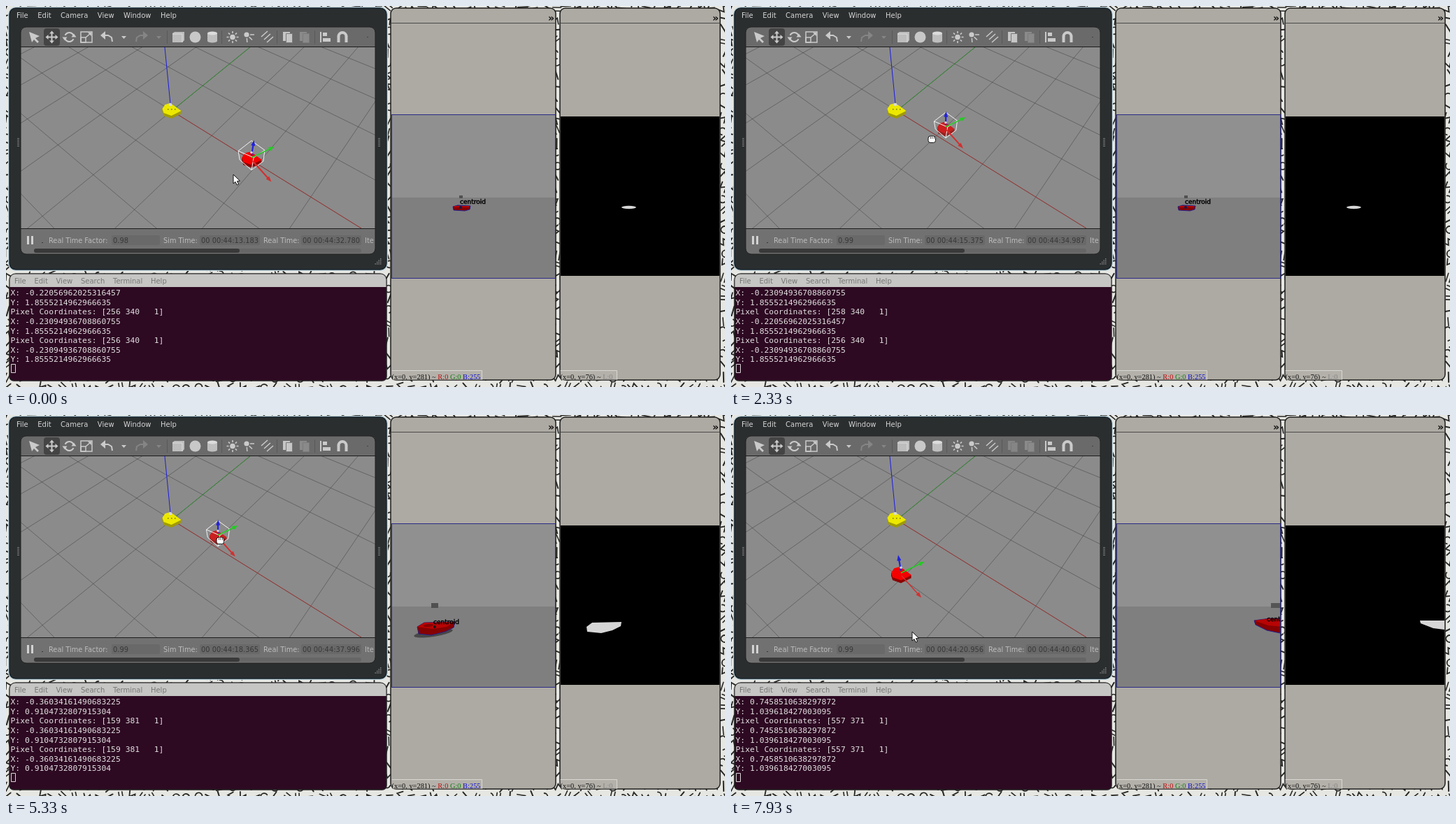
These frames come from a looping animation (1028x545 px, 8 s). An HTML page with a canvas:

```html
<!DOCTYPE html>
<html lang="en">
<head>
<meta charset="utf-8">
<title>Robot simulation desktop</title>
<style>
html, body { margin: 0; width: 100%; height: 100%; overflow: hidden; background: #e4e4e0; }
canvas { display: block; }
</style>
</head>
<body>
<canvas id="stage" width="1028" height="545"></canvas>
<script>
const W = 1028, H = 545, LOOP = 8000;
const SANS = '"DejaVu Sans", sans-serif';
const MONO = '"DejaVu Sans Mono", monospace';
const SERIF = '"Liberation Serif", serif';
const screen = document.getElementById('stage').getContext('2d');
let g = screen;

// ---- drawing helpers ----
function rect(x, y, w, h, fill) { g.fillStyle = fill; g.fillRect(x, y, w, h); }
function paint(fill, stroke, width = 1) {
  if (fill) { g.fillStyle = fill; g.fill(); }
  if (stroke) { g.strokeStyle = stroke; g.lineWidth = width; g.stroke(); }
}
function round(x, y, w, h, r, fill, stroke, width) {
  g.beginPath(); g.roundRect(x, y, w, h, r); paint(fill, stroke, width);
}
function trace(p, ox = 0, oy = 0, s = 1) {
  g.beginPath();
  for (let i = 0; i < p.length; i += 2) g.lineTo(ox + p[i] * s, oy + p[i + 1] * s);
}
function poly(p, fill, ox, oy, s, stroke) { trace(p, ox, oy, s); g.closePath(); paint(fill, stroke); }
function line(p, color, width, ox, oy, s) { trace(p, ox, oy, s); paint(null, color, width); }
function arc(x, y, r, a, b, color, width) { g.beginPath(); g.arc(x, y, r, a, b); paint(null, color, width); }
function oval(x, y, rx, ry, fill, tilt = 0, stroke) {
  g.beginPath(); g.ellipse(x, y, rx, ry, tilt, 0, 7); paint(fill, stroke);
}
function disc(x, y, r, fill) { oval(x, y, r, r, fill); }
function text(s, x, y, size, color, font = SANS, weight = '') {
  g.font = `${weight} ${size}px ${font}`; g.fillStyle = color; g.fillText(s, x, y);
  return x + g.measureText(s).width;
}
function menu(names, x, y, gap, color) {
  for (const s of names.split(' ')) x = text(s, x, y, 10, color) + gap;
}
function clipped(x, y, w, h, draw) {
  g.save(); g.beginPath(); g.rect(x, y, w, h); g.clip(); draw(); g.restore();
}
function spin(x, y, a, draw) { g.save(); g.translate(x, y); g.rotate(a); draw(); g.restore(); }

// ---- timing ----
const GRAB = 1000, DROP = 2860, GRAB_2 = 5200, DROP_2 = 6800, JUMP = 7200;

function snap(t) {
  if (t > 1670 && t < 2330) t = 1670;
  const step = t < 4000 ? 66.7 : 200;
  return Math.floor(t / step) * step;
}
function along(keys, t) {
  const i = keys.findIndex(k => k[0] > t);
  if (i < 1) return (i ? keys.at(-1) : keys[0]).slice(1);
  const a = keys[i - 1], b = keys[i], f = (t - a[0]) / (b[0] - a[0]);
  return [a[1] + (b[1] - a[1]) * f, a[2] + (b[2] - a[2]) * f];
}
const BOAT = [[GRAB, 351, 220], [1330, 337, 207], [2260, 307, 176], [DROP, 304, 174], [GRAB_2, 303, 175],
  [6200, 248, 231], [6600, 243, 229]];
const MOUSE = [[0, 325, 241], [900, 344, 222], [1330, 330, 212], [2260, 287, 191], [DROP, 287, 191],
  [3260, 337, 254], [4200, 337, 254], [GRAB_2, 306, 180], [6200, 255, 231], [DROP_2, 251, 232], [7400, 259, 310]];

// ---- static desktop ----
function random(seed) {
  return () => (seed = (seed * 16807) % 2147483647) / 2147483647;
}
function wallpaper() {
  const rnd = random(77), ink = '#272726', cell = 16;
  rect(0, 0, W, H, '#e6e6e2');
  g.lineCap = 'round';
  for (let y = 0; y < H + cell; y += cell) for (let x = 0; x < W + cell; x += cell) {
    const kind = rnd() * 4 | 0;
    spin(x + rnd() * 5, y + rnd() * 5, rnd() * 6.3, () => {
      if (kind == 0) line([-7, 0, 7, 0], ink, 2);
      else if (kind == 1) for (const d of [-3, 2]) line([-6, d, 6, d], ink, 1.6);
      else if (kind == 2) line([-7, -3, -2, 4, 2, -4, 7, 3], ink, 1.8);
      else arc(0, 0, 5, 0, 4, ink, 1.8);
    });
  }
  g.lineCap = 'butt';
}

// Ground plane: the vanishing points of both axes, seen from above.
function project(x, y) {
  const a = -0.0649 * x, b = 0.076 * y, w = 1 + a + b;
  return [(237 - 585 * a + 863 * b) / w, (150 - 360 * (a + b)) / w];
}
function ground() {
  const gray = 'rgba(50,50,50,.55)';
  rect(21, 59, 507, 260, '#8b8b8b');
  for (let i = -10; i <= 10; i++) {
    const xEnd = Math.min(10, (0.85 + 0.076 * i) / 0.0649);
    const yEnd = Math.max(-10, (0.0649 * i - 0.85) / 0.076);
    line([...project(-10, i), ...project(xEnd, i)], gray, 0.8);
    line([...project(i, 10), ...project(i, yEnd)], gray, 0.8);
  }
  line([237, 150, 508, 318], '#a03434', 1);
  line([237, 150, 349, 59], '#2f8a2f', 1);
  line([235, 140, 227, 59], '#1c1ce0', 1);
}

function toolbar() {
  const c = '#cacaca', dim = '#858585';
  rect(21, 30, 507, 29, '#6a6a6a');
  round(54, 32, 23, 25, 4, '#444');
  poly([33, 37, 48, 43, 42, 46, 47, 51, 45, 53, 40, 48, 37, 52], c);
  for (let i = 0; i < 4; i++) spin(65.5, 44.5, i * Math.PI / 2, () => {
    line([0, 0, 6, 0], c, 2); poly([5, -3.5, 9, 0, 5, 3.5], c);
  });
  for (let i = 0; i < 2; i++) spin(90.5, 44.5, i * Math.PI, () => {
    arc(0, 0, 6.5, 0.4, 2.8, c, 2); poly([3, 0, 10, 0, 6.5, -5], c);
  });
  round(107, 37, 16, 15, 0, null, c, 1.5);
  round(107, 45, 7, 7, 0, null, c, 1.5);
  line([114, 45, 121, 39], c, 1.6); poly([117, 38, 122, 38, 122, 43], c);
  for (const [x, d, color] of [[144, 1, c], [194, -1, dim]]) {
    g.save(); g.translate(x, 45); g.scale(d, 1);
    line([-7, -3, 2, -3, 7, 0, 8, 6], color, 2); poly([-9, -3, -2, -9, -2, 3], color);
    g.restore();
    poly([-3.5, -2, 3.5, -2, 0, 2], color, x + 24.5, 45);
  }
  for (const x of [230, 308, 387, 441]) rect(x, 35, 1, 19, '#595959');
  poly([238, 39, 241, 37, 255, 37, 255, 49, 252, 52, 238, 52], '#bdbdbd');
  line([238, 40, 252, 40, 252, 52], '#dedede', 1);
  disc(270.5, 44.5, 8, '#c8c8c8');
  rect(288, 39, 14, 11, '#bebebe');
  oval(295, 50, 7, 2.6, '#bebebe'); oval(295, 39, 7, 2.6, '#dcdcdc');
  disc(324, 44.5, 3.8, c);
  for (let i = 0; i < 8; i++) spin(324, 44.5, i * Math.PI / 4, () => line([5.5, 0, 8.5, 0], c, 1.6));
  disc(344, 41, 3.6, c);
  for (let i = 0; i < 3; i++) {
    spin(344, 41, i * 0.75, () => line([5, 0, 11, 0], c, 1.5));
    line([365 + i * 4, 44 + i * 4, 374 + i * 4, 36 + i * 4], c, 1.5);
  }
  rect(449, 37, 2, 15, c); rect(453, 38, 6, 5, c); rect(453, 46, 11, 5, c);
  arc(481, 43.5, 5.5, Math.PI, 0, c, 4);
  for (const x of [473.5, 484.5]) rect(x, 43, 4, 9, c);
  rect(516, 44, 2, 1, '#444');
}

function simWindow() {
  round(5, 3, 539, 374, 9, null, '#c3d6de', 4);
  round(5, 3, 539, 374, 9, '#2b2e2f', '#17242c', 1.5);
  menu('File Edit Camera View Window Help', 15, 17, 13.5, '#d4d4d4');
  g.save(); g.beginPath(); g.roundRect(21, 30, 507, 325, 8); g.clip();
  rect(21, 30, 507, 325, '#717171');
  toolbar();
  clipped(21, 59, 507, 260, ground);
  for (const y of [58, 318]) rect(21, y, 507, 1, '#1c1c1c');
  for (const x of [30, 36]) rect(x, 329, 3, 12, '#d2d2d2');
  rect(51, 338, 2, 1, '#383838');
  for (const [s, x] of [['Real Time Factor:', 61], ['Sim Time:', 225], ['Real Time:', 368], ['Ite', 513]])
    text(s, x, 338.5, 9.8, '#bcbcbc');
  for (const [x, w] of [[151, 69], [277, 86], [422, 86]]) round(x, 328, w, 14, 2, '#696969');
  round(40, 347, 468, 6, 3, '#666');
  round(40, 347, 294, 6, 3, '#393939');
  g.restore();
  round(21, 30, 507, 325, 8, null, '#202020');
  for (const x of [16, 532]) for (let i = 0; i < 6; i++) rect(x, 189 + i * 2.2, 3, 1, '#777');
  for (let i = 0; i < 4; i++) for (let j = 0; j <= i; j++) rect(535 - j * 2.5, 361 + i * 2.4, 1.4, 1.4, '#8a8a8a');
}

function terminal() {
  round(5, 383, 539, 153, [9, 9, 6, 6], '#2d0922', '#222', 1.5);
  round(5.5, 383.5, 538, 18.5, [8, 8, 0, 0], '#c6c6c4');
  menu('File Edit View Search Terminal Help', 12, 397, 11.7, '#777');
}

function viewer(x, w) {
  round(x, 3, w, 532, 8, '#adaaa3', '#1d1d1d', 1.5);
  rect(x + 1, 24, w - 2, 1, '#4b4a47');
  text('»', x + w - 11, 22, 14, '#111', SANS, 'bold');
}
function statusBar(x, right, parts) {
  clipped(x, 515, right - x + 1, 19.5, () => {
    rect(x, 521, right - x, 14, '#b4b1aa');
    line([x, 521.5, right - 0.5, 521.5, right - 0.5, 535], '#d9d7d2', 1);
    let at = x;
    for (const [s, color] of parts) at = text(s, at, 534, 10.4, color, SERIF);
  });
}

function desktop() {
  wallpaper();
  simWindow();
  terminal();
  viewer(550, 236);
  statusBar(551.5, 681, [['(x=0, y=281) ~ ', '#111'], ['R:0 ', '#c01010'], ['G:0 ', '#108010'], ['B:255', '#1010d0']]);
  viewer(792, 229);
  statusBar(792.5, 874, [['(x=0, y=76) ~ ', '#111'], ['L:0', '#858585']]);
  rect(793, 158, 227, 228, '#000');
  rect(551, 155, 235, 235, '#2a2a84');
  rect(552, 156, 233, 118, '#909090');
  rect(552, 274, 233, 115, '#7f7f7f');
}

// ---- moving parts ----
const HULL = [-13, -3, -9, -9, -2, -11, 3, -8, 14, 0, 0, 7, -11, 3];

function hull(x, y, s, top, side) {
  for (let d = 4; d > 0; d--) poly(HULL, side, x, y + d, s);
  poly(HULL, top, x, y, s);
}
function arrow(x, y, dx, dy, color, width) {
  const n = Math.hypot(dx, dy);
  spin(x, y, Math.atan2(dy, dx), () => {
    line([0, 0, n - 5, 0], color, width);
    poly([n, 0, n - 8, 3, n - 8, -3], color);
  });
}
function yellowBoat() {
  hull(236.5, 150, 1, '#ece800', '#a09c00');
  for (const x of [231, 236, 241]) rect(x, 147, 1.5, 1.5, '#77740a');
  disc(235, 141, 2.2, '#d8d8e4');
}
function redBoat(x, y, selected, held) {
  const s = 0.92 + (y - 176) * 0.003;
  hull(x, y, s, held ? '#cb2020' : '#f40000', held ? '#962424' : '#8c0000');
  if (selected) {
    const white = '#f4f4f4';
    poly([-18, -12, 0, -26, 18, -13, 3, -3], null, x, y, s, white);
    line([-18, -12, -16, 0, 0, 14, 16, 2, 18, -13], white, 1, x, y, s);
    line([3, -3, 0, 14], white, 1, x, y, s);
  }
  arrow(x + 1, y + 1, 26 * s, 29 * s, '#d23030', selected ? 2 : 1.4);
  arrow(x, y - 3, 31 * s, -15 * s, '#22cc22', 1.6);
  arrow(x, y - 6, (x - 300) * 0.07, -21 * s, '#2222d8', 2.2);
  disc(x, y - 10 * s, 1.8, '#d0d0e0');
}
function pointer(x, y) {
  poly([0, 0, 0, 13, 3, 10.5, 5.2, 15, 7.6, 14, 5.5, 9.5, 9.5, 9.2], '#fff', x, y, 1, '#111');
}
function hand(x, y) {
  round(x - 5, y - 5, 10.5, 9.5, 3, '#fff', '#111');
  for (const d of [-2, 0.5, 3]) rect(x + d, y - 4, 0.8, 3, '#333');
}

function copyIcons(on) {
  for (const [x, c] of [[396, on ? '#c6c6c6' : '#858585'], [420, '#8a8a8a']]) {
    rect(x, 37, 10, 13, c);
    round(x + 4.5, 39.5, 9, 13, 0, c, '#7a7a7a');
  }
}
function clock(t) {
  const n = Math.floor(t / 200), color = '#383838';
  const stamp = (from, step) => '00 00:44:' + (from + step * n).toFixed(3);
  text(n < 3 ? '0.98' : '0.99', 153, 338.5, 9.9, color);
  text(stamp(13.183, 0.1993), 279, 338.5, 9.9, color);
  text(stamp(32.78, 0.2006), 424, 338.5, 9.9, color);
}

// Tracked pixels in the order they are logged; the position follows from the camera model.
const PIXELS = { a: [256, 340], b: [258, 340], c: [256, 339], d: [159, 381], e: [557, 371] };
const LOG = 'baacaacaaabaaa' + 'd'.repeat(19) + 'eee';
const CENTER = 300.5, HEIGHT = 0.205, REACH = 73.2930991037182;

function readout(t) {
  const i = Math.floor(t / 233);
  const rows = [...LOG.slice(i, i + 3)].flatMap(key => {
    const [col, row] = PIXELS[key], depth = row - CENTER;
    return [`Pixel Coordinates: [${col} ${row}   1]`, 'X: ' + HEIGHT * (col - CENTER) / depth, 'Y: ' + REACH / depth];
  }).slice(1);
  rows.forEach((s, k) => text(s, 6.5, 414 + k * 13.64, 11.37, '#e2dfe0', MONO));
  round(7.5, 512.5, 6, 12, 0, null, '#dcd8da');
}

// ---- camera image and its mask ----
const RED = '#b80404', DARK = '#860202', EDGE = '#222290', MASK = '#d6d6d6';

function label(x, y) {
  text('centroid', x, y, 9, '#000');
  g.strokeStyle = '#000'; g.lineWidth = 0.45; g.strokeText('centroid', x, y);
}
const VIEWS = [{
  image() {
    rect(648, 271, 5, 4, '#505050');
    poly([639, 287, 646, 285, 664, 286, 663, 291, 656, 293, 640, 292], DARK, 0, 0, 1, EDGE);
    rect(641, 286, 21, 2, RED);
    disc(650, 288, 2, '#181848');
    label(649, 283);
  },
  mask() { oval(890.5, 288, 10.5, 2.2, MASK); }
}, {
  image() {
    rect(608, 269, 10, 7, '#505050');
    oval(611, 312, 28, 5, '#484848', -0.15);
    poly([588, 303, 598, 297, 642, 296, 640, 304, 628, 310, 608, 315, 590, 313], DARK, 0, 0, 1, EDGE);
    poly([588, 303, 598, 297, 642, 296, 630, 303, 610, 306], RED);
    oval(604, 301, 7, 2, DARK, -0.1);
    disc(613, 303, 2, '#181818');
    label(611, 299);
  },
  mask() { poly([830, 303, 838, 297, 880, 296, 879, 302, 867, 308, 851, 312, 831, 310], MASK); }
}, {
  image() {
    rect(772, 269, 13, 7, '#555');
    poly([748, 294, 770, 291, 790, 292, 790, 313, 766, 308, 750, 300], DARK, 0, 0, 1, EDGE);
    poly([748, 294, 770, 291, 790, 292, 790, 303, 768, 301], RED);
    label(766, 295);
  },
  mask() { poly([985, 294, 1021, 294, 1021, 307, 1004, 305, 986, 298], MASK); }
}];

// ---- scene ----
const base = document.createElement('canvas');
base.width = W; base.height = H;
g = base.getContext('2d');
desktop();
g = screen;

function render(now) {
  const t = snap(now % LOOP);
  const second = t >= GRAB_2 && t < DROP_2;
  const selected = t < DROP || second;
  const held = selected && t >= GRAB;
  const view = VIEWS[t < DROP ? 0 : t < JUMP ? 1 : 2];
  g.drawImage(base, 0, 0);
  copyIcons(selected);
  clock(t);
  readout(t);
  yellowBoat();
  redBoat(...along(BOAT, t), selected, held);
  (held ? hand : pointer)(...along(MOUSE, t));
  clipped(552, 156, 233, 233, view.image);
  clipped(793, 158, 227, 228, view.mask);
}

const start = performance.now();
function tick() {
  render(performance.now() - start);
  requestAnimationFrame(tick);
}
tick();
</script>
</body>
</html>
```
